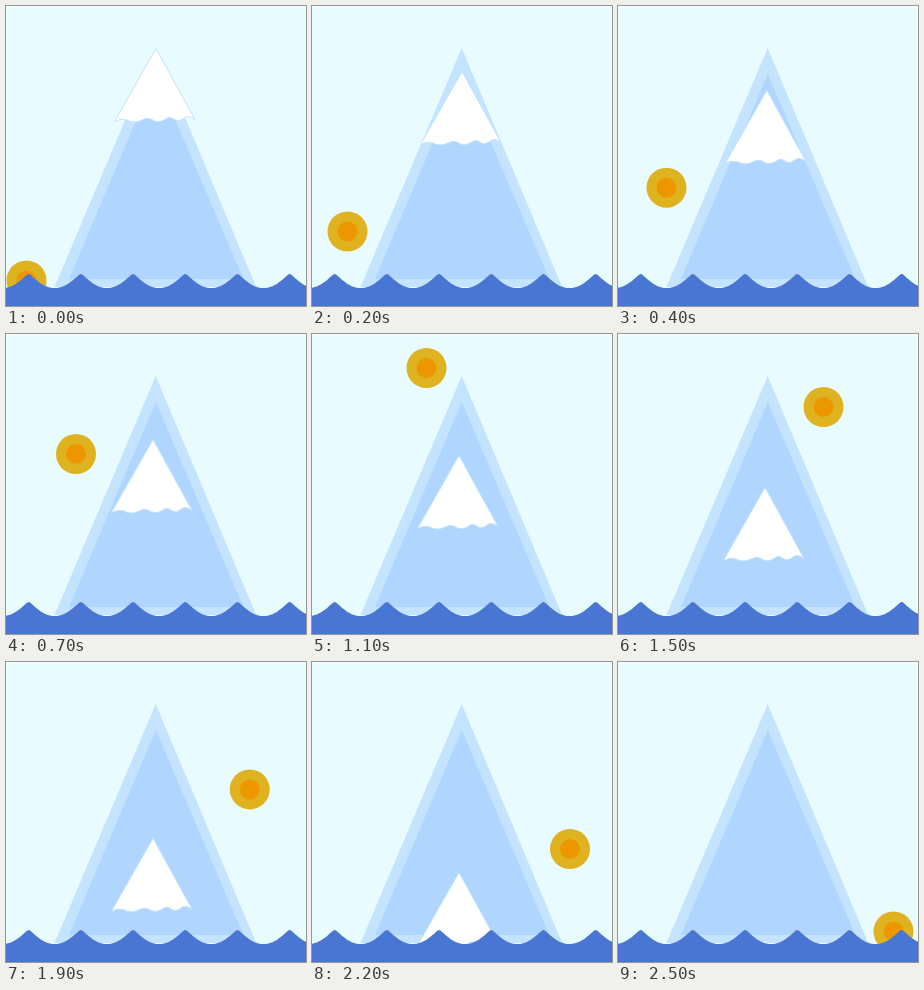
Recreate the animation shown at these times as an HTML page. Size 300 px wide and 300 px high, loop 2600 ms.

```html
<!DOCTYPE html>
<html lang="en">
<head>
<meta charset="utf-8">
<title>Sun and melting peak</title>
<style>
  html, body { margin: 0; width: 100%; height: 100%; overflow: hidden; background: #fff; }
  svg { display: block; width: 100vw; height: 100vh; }
</style>
</head>
<body>
<svg viewBox="0 0 300 300">
  <rect y="1" width="299" height="298" fill="#e8fbff"/>
  <g id="sun">
    <circle r="20" fill="#dfb220"/>
    <circle r="10" fill="#ed9700"/>
  </g>
  <path d="M149.7 42L250.2 281H48.5Z" fill="#c3e3ff"/>
  <path d="M149.8 68L237.3 273H63Z" fill="#b0d6ff"/>
  <path id="snow" fill="#fff" stroke="#c3e3ff" d="M150 42.5L189 113.5Q182 108 177.5 112.5Q172 117 166 112Q163 110 159 113.5Q152 118 145 113Q141 111 136 114Q128 118 121 114Q115 112 108.5 115.5Z"/>
  <path id="sea" fill="#4876d2"/>
</svg>
<script>
const LOOP = 2600, STEP = 100;
const [sun, snow, sea] = ["sun", "snow", "sea"].map(id => document.getElementById(id));

// key poses: time, sun x, sun y, snow drop
const poses = [
  [0, 20.5, 274.5, 0],
  [200, 35.5, 225.5, 23],
  [700, 70, 120, 63],
  [1100, 114.5, 34, 79],
  [1500, 205.5, 73, 111],
  [2200, 258, 187, 168],
  [2500, 275.5, 269.5, 235]
];

const rate = (i, k) => (poses[i + 1][k] - poses[i][k]) / (poses[i + 1][0] - poses[i][0]);

// tangent of column k at pose i
function slope(i, k) {
  if (i === 0) return rate(0, k);
  if (i === poses.length - 1) return rate(i - 1, k);
  const before = poses[i][0] - poses[i - 1][0], after = poses[i + 1][0] - poses[i][0];
  return (after * rate(i - 1, k) + before * rate(i, k)) / (before + after);
}

// smooth curve through column k
function curve(k, t) {
  const i = Math.max(0, poses.findIndex(pose => pose[0] >= t) - 1);
  const a = poses[i], b = poses[i + 1], span = b[0] - a[0];
  const p = (t - a[0]) / span, q = 1 - p;
  return q * q * (1 + 2 * p) * a[k] + p * p * (3 - 2 * p) * b[k]
    + span * p * q * (q * slope(i, k) - p * slope(i + 1, k));
}

function move(el, x, y) {
  el.setAttribute("transform", `translate(${x} ${y})`);
}

function seaPath() {
  const half = 26.1, top = 267.9, low = 282;
  let d = `M-29.5 ${top}`;
  for (let i = 0; i < 7; i++) {
    const x = -29.5 + i * 2 * half, mid = x + half, end = mid + half;
    d += `C${x + 3} ${top} ${mid - 14} ${low} ${mid} ${low}S${end - 3} ${top} ${end} ${top}`;
  }
  return d + "V300H-30Z";
}

function draw(now) {
  const t = Math.floor(now % LOOP / STEP) * STEP;
  const drift = Math.min(1, Math.max(0, (t - 200) / 500));
  move(sun, curve(1, t), curve(2, t));
  move(snow, -3 * drift, curve(3, t));
}

sea.setAttribute("d", seaPath());
const start = performance.now();
function tick() {
  draw(performance.now() - start);
  requestAnimationFrame(tick);
}
tick();
</script>
</body>
</html>
```
